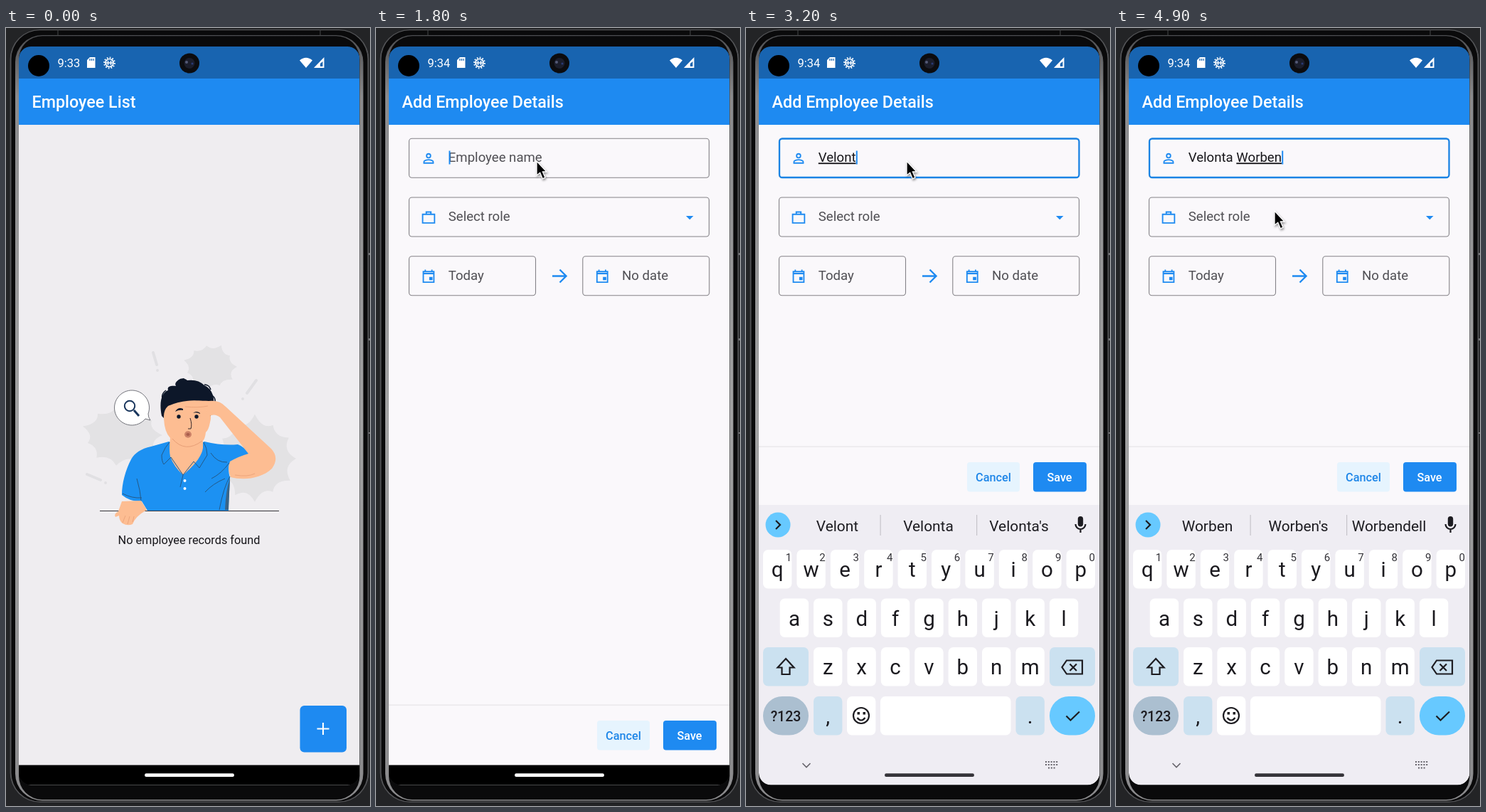
Recreate the animation shown at these times as an HTML page. Size 512x1093 px, loop 5 s.

```html
<!DOCTYPE html>
<html lang="en">
<head>
<meta charset="utf-8">
<title>Employee form</title>
<style>
  html, body { margin: 0; width: 100%; height: 100%; overflow: hidden; background: #232426; }
  svg { display: block; width: 100%; height: 100%; }
  text { font-family: Roboto, sans-serif; white-space: pre; }
  .title { font-size: 23.3px; font-weight: 500; fill: #fff; }
  .field { font-size: 18.6px; fill: #504f54; }
  .button { font-size: 16.3px; font-weight: 500; text-anchor: middle; }
  .box { fill: none; stroke: #858388; stroke-width: 1.1; }
  .line { fill: none; stroke: #1e8af1; stroke-width: 2; }
  .ink { fill: none; stroke: #1d1c21; stroke-width: 2.2; }
  .key { font-size: 29.5px; text-anchor: middle; fill: #1b1a1f; }
  .hint { font-size: 15px; text-anchor: middle; fill: #333238; }
  .word { font-size: 20.9px; text-anchor: middle; fill: #1d1c21; }
  .under { text-decoration: underline; text-decoration-thickness: 1.2px; }

  #form, #footer, #keyboard, #focus, #caret, #handle, #cursor { animation: 5s infinite linear; }
  #form { animation-name: open; }
  #footer { animation-name: lift; }
  #keyboard { animation-name: rise; }
  #focus { animation-name: focus; }
  #caret { animation-name: caret; }
  #handle { animation-name: handle; }
  #cursor { animation-name: point; filter: drop-shadow(1px 2px 1.5px #0006); }

  @keyframes open {
    0%, 20% { opacity: 0; transform: translateY(60px); animation-timing-function: ease-out; }
    24%, 100% { opacity: 1; transform: none; }
  }
  @keyframes lift {
    0%, 38% { transform: none; animation-timing-function: ease-out; }
    44%, 100% { transform: translateY(-363px); }
  }
  @keyframes rise {
    0%, 38% { transform: translateY(393px); animation-timing-function: ease-out; }
    44%, 100% { transform: none; }
  }
  @keyframes focus { 0%, 36.99% { opacity: 0; } 37%, 100% { opacity: 1; } }
  @keyframes caret { 0%, 34.99% { opacity: 0; } 35%, 100% { opacity: 1; } }
  @keyframes handle {
    0%, 40.99% { fill: #fff; }
    41%, 50.99% { fill: #a5a3a8; }
    51%, 100% { fill: #353439; }
  }
  @keyframes point {
    0%, 9.99% { opacity: 0; transform: translate(500px, 1030px); }
    10% { opacity: 1; transform: translate(500px, 1030px); animation-timing-function: ease-out; }
    16%, 25% { opacity: 1; transform: translate(439px, 975px); animation-timing-function: ease-in-out; }
    30%, 92% { opacity: 1; transform: translate(226px, 187px); animation-timing-function: ease-in-out; }
    97%, 100% { opacity: 1; transform: translate(223px, 257px); }
  }
</style>
</head>
<body>
<svg viewBox="0 0 512 1093" preserveAspectRatio="none">
  <defs>
    <linearGradient id="rim" x2="0" y2="1">
      <stop stop-color="#4c4d50"/><stop offset=".08" stop-color="#8a8a8c"/>
      <stop offset=".5" stop-color="#a2a2a3"/><stop offset="1" stop-color="#8a8a8c"/>
    </linearGradient>
  </defs>

  <g id="list">
    <path fill="#efedf0" d="M18 130H498V1036H18z"/>
    <path fill="#1e8af1" d="M18 70H498V136H18z"/>
    <text class="title" x="36.5" y="112">Employee List</text>
    <g id="splats" fill="#e3e2e4"></g>
    <path fill="none" stroke="#e1e0e3" stroke-width="4" stroke-linecap="round" d="M207 456L212 473M213 481v.1M352 495L339 513M333 521v.1M114 627L133 635M140 639v.1"/>
    <path fill="#fff" stroke="#62646b" stroke-width=".9" d="M203 551L196 549A24.5 24.5 0 1 1 200 542Q200 547 203 551z"/>
    <g fill="none" stroke="#18355c"><circle cx="174" cy="531" r="7.2" stroke-width="2"/><path stroke-width="3" d="M180 537L187 545"/></g>
    <path stroke="#36363a" d="M132 678.5H384"/>
    <path fill="#1c91f2" d="M229 581L204 588C190 591 181 597 176 606C168 621 163 640 163 656Q175 666 191 665L199 678H313C313 660 315 642 315 632Q312 622 314 612Q325 603 342 599Q335 588 326 585Q305 587 279 581L256 592z"/>
    <path fill="#0d1729" d="M219 545C215 525 219 512 228 509C226 503 233 502 239 503Q236 498 244 494Q251 491 255 495Q270 493 279 502Q294 509 292 530L286 552H226z"/>
    <path fill="none" stroke="#0d1729" stroke-width="1.5" d="M222 524q-6-8 3-15M240 500q2-8 11-7M279 501q7 0 9 7M291 517q5 4 2 12"/>
    <path fill="#fdbd92" d="M228 531Q250 521 277 524Q285 528 285 542Q290 543 287 554Q285 565 281 568Q280 577 277 580V590Q275 606 249 628Q236 616 231 602Q229 592 231 576Q223 568 222 549Q221 537 228 531z"/>
    <path fill="none" stroke="#e79f77" d="M234 577Q252 598 276 580"/>
    <path fill="#fdbd92" d="M229 531C245 526 265 523 285 524Q300 522 309 532L373 591Q385 604 374 619C359 633 335 636 316 631Q311 620 315 609Q327 602 341 598L301 547Q294 541 286 545Q279 543 283 537Q261 538 231 536z"/>
    <path fill="#fdbd92" d="M163 665L158 679Q151 683 154 687L159 685Q159 692 164 696Q171 700 178 697Q182 686 198 677L190 664z"/>
    <path fill="none" stroke="#e79f77" stroke-width=".8" d="M164 695l4-10M171 697l3-11M178 694l2-8M252 532Q270 534 284 531M322 628Q340 631 350 626"/>
    <g fill="#0d1729">
      <circle cx="243" cy="546" r="2.7"/><circle cx="268" cy="546" r="2.7"/>
      <path d="M238 539Q242 532 249 535V537Q243 536 238 539zM263 541Q268 537 273 541V542Q268 539 263 541z"/>
    </g>
    <path fill="none" stroke="#33262a" d="M259 548Q262 557 260 563h-4"/>
    <ellipse cx="256" cy="571" rx="5" ry="4.7" fill="#cd8268"/><ellipse cx="256" cy="571" rx="2.6" ry="2" fill="#a95d4c"/>
    <path fill="none" stroke="#245987" d="M230 582Q224 588 219 600Q219 609 222 613L232 603L249 628L245 645M278 582Q283 590 283 600L272 618L264 609L249 628M184 633Q189 650 190 664M164 654Q177 661 191 660M314 611Q303 626 289 633M315 630Q306 645 300 677M308 633Q291 640 280 652M288 597q9 14 23 13"/>
    <path fill="#3b6588" d="M315 632Q309 650 308 677H313z"/>
    <g fill="#fff"><circle cx="251.5" cy="636" r="2"/><circle cx="251.5" cy="647" r="2"/></g>
    <text class="button" x="257.5" y="725" style="font-weight:400" fill="#17161a">No employee records found</text>
    <rect x="413.5" y="952" width="65.5" height="65.5" rx="6" fill="#1e8af1"/>
    <path stroke="#fff" stroke-width="2.1" d="M437.5 984.5h17M446 976v17"/>
  </g>

  <g id="form">
    <path fill="#faf8fb" d="M18 130H498V1036H18z"/>
    <path fill="#1e8af1" d="M18 70H498V136H18z"/>
    <text class="title" x="36.5" y="112">Add Employee Details</text>
    <g id="fields"></g>
    <path fill="#1e8af1" d="M436 264h10.5l-5.2 5.3z"/>
    <path class="line" style="stroke-width:2.4" d="M248 348.5h18M258.500 339.5l9 9-9 9"/>
    <rect id="focus" x="47" y="155.5" width="421.5" height="54.5" rx="4" fill="none" stroke="#1a83e4" stroke-width="2.3"/>
    <text id="name" class="field" x="101.8" y="188.3"></text>
    <rect id="caret" y="172.5" width="2" height="19" fill="#1e8af1"/>
    <g id="footer">
      <path fill="#e7e5e9" d="M18 950.5H498v1.2H18z"/>
      <rect x="311" y="973" width="74" height="41.5" rx="4" fill="#e6f4fe"/>
      <rect x="404" y="973" width="75" height="41.5" rx="4" fill="#1e8af1"/>
      <text class="button" x="348" y="999.5" fill="#1e86e8">Cancel</text>
      <text class="button" x="441" y="999.5" fill="#fff">Save</text>
    </g>
  </g>

  <path d="M18 1035.5H498V1064H18z"/>

  <g id="keyboard">
    <path fill="#efedf3" d="M18 670H498V1064H18z"/>
    <circle cx="45" cy="698" r="17.5" fill="#67c9ff"/>
    <path id="chevron" class="ink"/>
    <g id="tools">
      <path class="ink" d="M106 689h15q2 0 2 2v9l-7 8h-10q-2 0-2-2v-15q0-2 2-2zM123 700h-5q-2 0-2 2v6M108 699q4 5 8 1"/>
      <path fill="#1d1c21" d="M108 693h3v3h-3zM116 693h3v3h-3z"/>
      <text x="181.5" y="704" font-size="17" font-weight="800" text-anchor="middle" fill="#1d1c21">GIF</text>
      <path class="ink" d="M245 689h-4v19h18v-19h-4M245 687.5h10v5h-10zM245 697h10M245 701h10M245 705h6"/>
      <circle class="ink" cx="318" cy="698" r="5.8" style="stroke-width:5"/>
      <circle class="ink" cx="318" cy="698" r="9" style="stroke-width:3;stroke-dasharray:4.7"/>
      <path fill="#c6c4ca" d="M359.5 685h1.2v26h-1.2z"/>
      <path class="ink" style="stroke-width:4.4;stroke-linecap:round" d="M394 698.5v.1M401.5 698.5v.1M409 698.5v.1"/>
    </g>
    <g id="words">
      <path fill="#c6c4ca" d="M188.5 684h1.2v29h-1.2zM324 684h1.2v29h-1.2z"/>
      <text class="word" x="128.5" y="707"></text>
      <text class="word" x="256.5" y="707"></text>
      <text class="word" x="384" y="707"></text>
    </g>
    <rect x="466.8" y="686" width="7.4" height="14.5" rx="3.7" fill="#1d1c21"/>
    <path class="ink" d="M463.5 697a7 7 0 0 0 14 0M470.5 704v5"/>
    <g id="keys"></g>
    <path class="ink" d="M56 886l11.5 12.5H61.5v9.500H50.5v-9.5H44.5z"/>
    <path class="ink" d="M451 888.5H473v19H451L444.5 898zM455.5 893.5l9.5 9.5M465 893.5l-9.5 9.5"/>
    <circle class="ink" cx="162" cy="966" r="11"/>
    <path class="ink" d="M156.5 969q5.5 7 11 0"/>
    <path fill="#1d1c21" d="M156.5 961h3.5v3.5h-3.5zM164.5 961h3.5v3.5h-3.5z"/>
    <path class="ink" d="M450.5 966.5l6 6L469 960.5"/>
    <path class="ink" style="stroke:#66646b;stroke-width:1.6" d="M79.5 1033l5.5 5.5 5.5-5.5"/>
    <path class="ink" style="stroke:#66646b;stroke-dasharray:2 1.8" d="M421 1031h19M421 1035h19M425 1039.5h11"/>
  </g>
  <rect id="handle" x="195" y="1047.3" width="126" height="4.8" rx="2.4"/>

  <g id="status">
    <path fill="#1864b0" d="M18 26H498V71H18z"/>
    <circle cx="46" cy="53" r="15"/>
    <text id="clock" x="72.5" y="55" font-size="16.5" fill="#fff"></text>
    <path fill="#fff" d="M118 41h7.5v15H114V45z"/>
    <path stroke="#1864b0" stroke-width="1.2" d="M118 43v3M120.5 43v3M123 43v3"/>
    <g fill="none" stroke="#fff">
      <circle cx="145.5" cy="49" r="5.5" stroke-width="1.7"/>
      <circle cx="145.5" cy="49" r="7.4" stroke-width="2" stroke-dasharray="1.7 2.17"/>
      <path stroke-width="1.4" d="M140 49h11M143.5 46v6M147.5 46v6"/>
    </g>
    <path fill="#fff" d="M413 45.5Q422 38 431 45.5L422 56z"/>
    <path fill="#fff" fill-rule="evenodd" d="M447.5 41V56H433zM445.5 47v7h-3.5v-4z"/>
    <circle cx="258" cy="49.5" r="14" fill="#0c0c0f"/>
    <circle cx="258" cy="49.5" r="7.5" fill="#1b1d2b"/>
    <circle cx="254" cy="48" r="2" fill="#555b78"/><circle cx="262" cy="50" r="1.5" fill="#2a3b78"/>
  </g>

  <g id="bezel" fill-rule="evenodd"></g>
  <path fill="none" stroke="#47484b" d="M73 2v8M442 2v8"/>
  <path fill="#737477" d="M510 316h2v3h-2zM510 436h2v3h-2zM510 568h2v2h-2z"/>

  <path id="cursor" stroke="#fff" stroke-width="1.3" d="M0 0V20L4.7 16.2L8.3 24.8L12 23.2L8.4 15H14z"/>
</svg>

<script>
const $ = id => document.getElementById(id);

// Rounded rectangle from edge to edge.
const round = (l, t, r, b, c) =>
  `M${l + c} ${t}H${r - c}A${c} ${c} 0 0 1 ${r} ${t + c}V${b - c}A${c} ${c} 0 0 1 ${r - c} ${b}` +
  `H${l + c}A${c} ${c} 0 0 1 ${l} ${b - c}V${t + c}A${c} ${c} 0 0 1 ${l + c} ${t}z`;
const ring = (fill, outer, inner) => `<path fill="${fill}" d="${outer}${inner}"/>`;
const screen = round(18, 26, 497.5, 1063.5, 17);
$('bezel').innerHTML =
  ring('#232426', 'M0 0H512V1093H0z', screen) +
  ring('#0a0a0b', round(5.5, 2, 510.5, 1088, 42), screen) +
  ring('#535457', round(5.5, 2, 510.5, 1088, 42), round(7.5, 3.2, 508.5, 1086.5, 40)) +
  ring('url(#rim)', round(13, 10, 502.5, 1085.5, 38), round(18, 11.2, 497.5, 1084, 33));

// Spiky blob: tips on an ellipse joined by inward curves.
function splat(cx, cy, rx, ry, tips) {
  const point = (i, r) => {
    const a = i / tips * Math.PI * 2;
    return `${cx + Math.cos(a) * rx * r} ${cy + Math.sin(a) * ry * r}`;
  };
  let d = `M${point(0, 1)}`;
  for (let i = 1; i <= tips; i++) {
    d += `Q${point(i - .5, .68)} ${point(i, i === tips ? 1 : .94 + .07 * Math.sin(i * 2.3))}`;
  }
  return `<path d="${d}z"/>`;
}
$('splats').innerHTML = splat(287, 476, 38, 33, 11) + splat(163, 572, 57, 44, 11) + splat(350, 605, 58, 62, 12);

const icons = {
  person: '<circle cx="12" cy="8" r="3"/><path d="M5 19v-2c0-2 4.3-3 7-3s7 1 7 3v2z"/>',
  work: '<path d="M3 7.5h18v13H3zM8.5 7V4h7v3"/>',
  event: '<path d="M4 5h16v16H4zM4 8h16M7 2v3M17 2v3"/><path fill="#1e8af1" d="M14 14h3v3h-3z"/>'
};
const field = (x, y, w, icon, label) => `
  <rect class="box" x="${x}" y="${y}" width="${w}" height="55" rx="4"/>
  <g class="line" transform="translate(${x + 16.3} ${y + 16.8}) scale(.93)">${icons[icon]}</g>
  <text class="field" x="${x + 55.3}" y="${y + 33}">${label}</text>`;
$('fields').innerHTML = field(46.5, 155.3, 422, 'person', '') + field(46.5, 238, 422, 'work', 'Select role') +
  field(46.5, 320.8, 178, 'event', 'Today') + field(290.8, 320.8, 178, 'event', 'No date');

const key = (x, y, w, fill, label = '', r = 7) => `
  <rect x="${x}" y="${y}" width="${w}" height="54.5" rx="${r}" fill="${fill}"/>
  <text class="key" x="${x + w / 2}" y="${y + 38}">${label}</text>`;
const pitch = 47.4, soft = '#cbe1f0';
const row = (letters, x, y) => [...letters].map((c, i) => key(x + i * pitch, y, 40.4, '#fff', c)).join('');
$('keys').innerHTML = row('qwertyuiop', 24, 733) + row('asdfghjkl', 47.7, 801.5) + row('zxcvbnm', 95, 870) +
  [...'1234567890'].map((c, i) => `<text class="hint" x="${60 + i * pitch}" y="749">${c}</text>`).join('') +
  key(24, 870, 64, soft) + key(427, 870, 64, soft) +
  key(24, 939, 64, '#abbfd0', '', 27) + key(95, 939, 40.4, soft, ',') + key(142, 939, 40.4, '#fff') +
  key(189, 939, 183.5, '#fff') + key(379.5, 939, 40.4, soft, '.') + key(427, 939, 64, '#67c9ff', '', 27) +
  '<text x="56" y="974" font-size="19.5" font-weight="500" text-anchor="middle" fill="#1d1c21">?123</text>';

const fullName = 'Velonta Worben';
const strokes = [2450, 2600, 2750, 2900, 3050, 3150, 3350, 3550, 3880, 4050, 4150, 4250, 4350, 4550];
const typedAt = t => fullName.slice(0, strokes.filter(s => s <= t).length);
const suggestionLag = 40;

function suggest(typed) {
  const words = typed.split(' ');
  const word = words.at(-1);
  const whole = fullName.split(' ')[words.length - 1];
  if (!word) return ['and', 'is', 'Hadborn'];
  if (word !== whole) return [word, whole, whole + "'s"];
  return [word, word + "'s", word + (words.length > 1 ? 'dell' : 's')];
}

function drawName(typed, known) {
  const label = $('name');
  const split = typed.lastIndexOf(' ') + 1;
  const marked = known && !known.endsWith(' ') && !typed.endsWith(' ');
  label.innerHTML = typed
    ? `${typed.slice(0, split)}<tspan class="${marked ? 'under' : ''}">${typed.slice(split)}</tspan>`
    : 'Employee name';
  label.style.fill = typed ? '#17161a' : '';
  $('caret').setAttribute('x', typed ? 102 + label.getComputedTextLength() : 102.5);
}

let start, shown;
function frame(now) {
  start ??= now;
  const t = (now - start) % 5000;
  const typed = typedAt(t), known = typedAt(t - suggestionLag);
  const clock = t < 1350 ? '9:33' : '9:34';
  const state = [typed, known, clock].join('|');
  if (state !== shown) {
    shown = state;
    $('clock').textContent = clock;
    drawName(typed, known);
    $('tools').style.display = known ? 'none' : '';
    $('words').style.display = known ? '' : 'none';
    $('chevron').setAttribute('d', known ? 'M42 692l6 6-6 6' : 'M48 692l-6 6 6 6');
    const words = suggest(known);
    document.querySelectorAll('.word').forEach((el, i) => { el.textContent = words[i]; });
  }
  requestAnimationFrame(frame);
}
requestAnimationFrame(frame);
</script>
</body>
</html>
```
